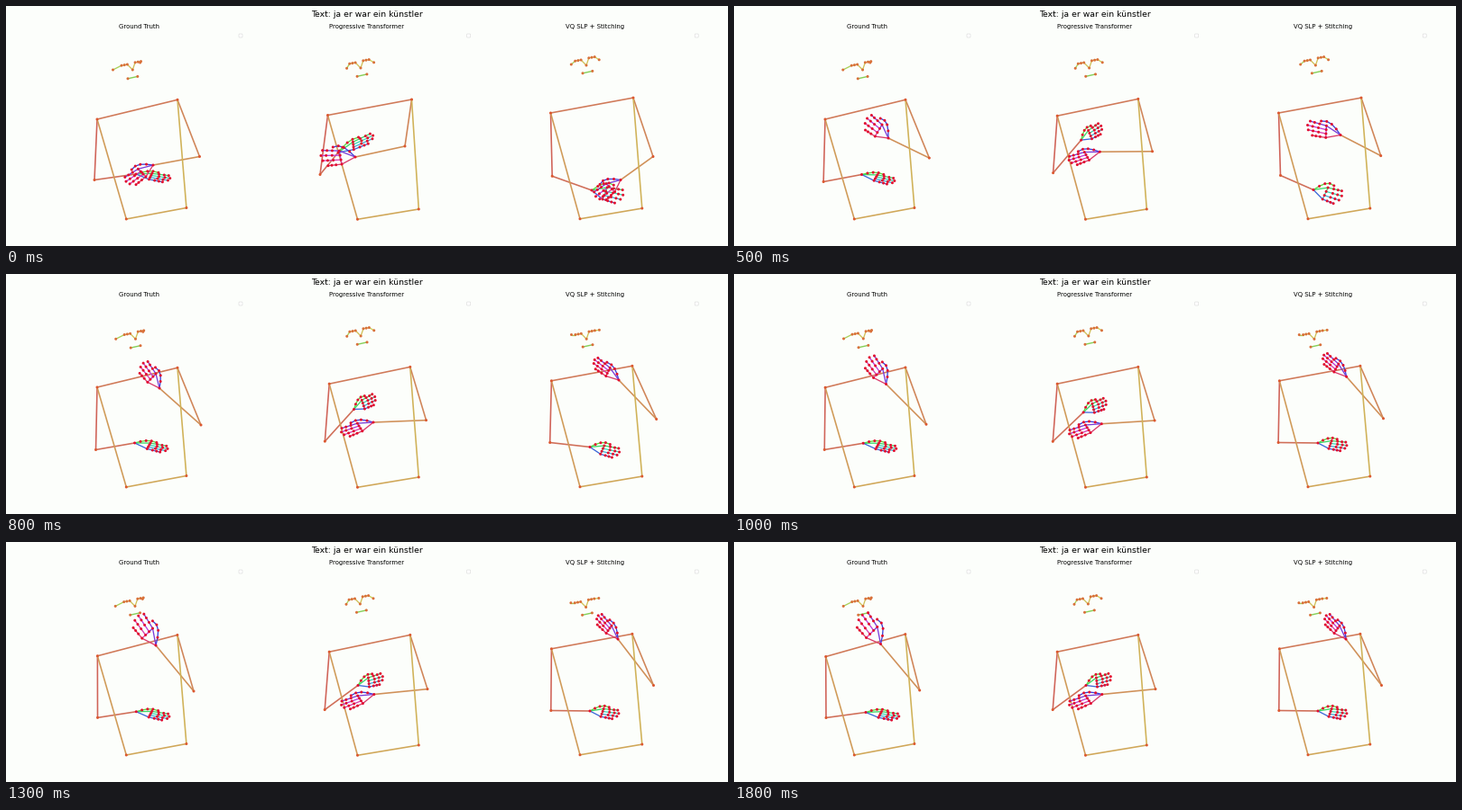
These frames come from a looping animation (800x267 px, 1.9 s). A matplotlib script:

```python
import colorsys

import matplotlib.pyplot as plt
import numpy as np
from matplotlib.animation import FuncAnimation
from matplotlib.collections import LineCollection
from matplotlib.patches import FancyBboxPatch

W, H, DPI = 800, 267, 100
PX = 72 / DPI
TICKS, TICK_MS = 38, 50

ARMS = ["ls le", "le lw", "ls rs", "rs re", "re rw", "ls lh", "lh rh", "rs rh"]
ARM_HUES = np.linspace(0.015, 0.125, len(ARMS))
LEFT_HUES = np.linspace(0.30, 0.62, 5)
RIGHT_HUES = np.linspace(0.66, 0.95, 5)


def hls(hue, light=0.58, sat=0.56):
    return colorsys.hls_to_rgb(hue, light, sat)


def path(n, keys):
    """Values at pose n, moving evenly between keys (pose, value, ...)."""
    times, *cols = np.array(keys, float).T
    return np.array([np.interp(n, times, c) for c in cols])


def points(n, keys):
    return path(n, keys).reshape(-1, 2)


def hand_shape(x, y, angle, length, width):
    """Thumb and four fingers; a negative width mirrors the hand."""
    a = np.radians(angle)
    along = length * np.array((np.cos(a), np.sin(a)))
    across = width * np.array((np.sin(a), -np.cos(a)))

    def at(u, v):
        return np.array((x, y)) + u * along + v * across

    thumb = [at(0.16 * j, 0.87 * np.sin(0.5 * j)) for j in range(5)]
    fingers = []
    for k in range(4):
        reach = 1 - 0.05 * (k - 1) ** 2
        base, side = 0.46 - 0.02 * k, 0.5 - k / 3
        fingers.append([at(base + (reach - base) * s, side * (1 + 0.15 * s))
                        for s in (0, 0.42, 0.73, 1)])
    return thumb, fingers


class Drawing:
    def __init__(self):
        self.segs, self.colors, self.widths = [], [], []
        self.dots, self.dot_colors = [], []

    def chain(self, pts, color, width):
        for a, b in zip(pts, pts[1:]):
            self.segs.append((a, b))
            self.colors.append(color)
            self.widths.append(width * PX)

    def dot(self, pts, color):
        self.dots.extend(pts)
        self.dot_colors.extend([color] * len(pts))

    def hand(self, pose, hues):
        thumb, fingers = hand_shape(*pose)
        colors = [hls(h, 0.54, 0.68) for h in hues]
        wrist, knuckles = thumb[0], [f[0] for f in fingers]
        self.chain(thumb, colors[0], 1.3)
        self.chain([wrist, knuckles[0]], colors[1], 1.3)
        self.chain([wrist, knuckles[3]], colors[4], 1.3)
        for finger, knuckle, color in zip(fingers, knuckles[1:] + knuckles[3:], colors[1:]):
            self.chain([finger[0], knuckle], color, 1.3)
            self.chain(finger, color, 1.3)
        self.dot(thumb + sum(fingers, []), "#e20f30")

    def face(self, nose, lift, ears, mouth):
        def eye(x, y, slope):
            return [nose + (x + 3.2 * j, y + slope * j) for j in range(3)]

        ears = nose + np.array(ears) + (0, lift)
        left, right = eye(-12.3, -4.8, -0.6), eye(2.8, -8.2, -0.6)
        lips = [nose + mouth, nose + mouth + (10.8, -2.4)]
        self.chain([ears[0], left[0]], hls(0.22), 1.3)
        self.chain([*left, nose, *right], hls(0.145), 1.3)
        self.chain([right[-1], ears[1]], hls(0.17), 1.3)
        self.chain(lips, hls(0.27), 1.4)
        self.dot([*ears, *left, nose, *right, *lips], "#d9703a")


class Signer:
    """Hand keys: pose, wrist x, y, angle, length, width."""

    def __init__(self, shoulders, hips, elbows, nose, ears, mouth, left, right):
        self.shoulders, self.hips, self.elbows = shoulders, hips, elbows
        self.nose, self.ears, self.mouth = nose, ears, np.array(mouth)
        self.left, self.right = left, right

    def draw(self, out, n):
        left, right = path(n, self.left), path(n, self.right)
        body = [*points(n, self.shoulders), *points(n, self.elbows), *np.array(self.hips)]
        out.dot(body, "#dc5830")
        joints = dict(zip(("ls", "rs", "le", "re", "lh", "rh"), body))
        joints.update(lw=left[:2], rw=right[:2])
        for bone, hue in zip(ARMS, ARM_HUES):
            out.chain([joints[j] for j in bone.split()], hls(hue), 1.6)
        x, y, lift = path(n, self.nose)
        out.face(np.array((x, y)), lift, self.ears, self.mouth)
        out.hand(left, LEFT_HUES)
        out.hand(right, RIGHT_HUES)


truth = Signer(
    shoulders=[(13, 101, 126, 190, 104.3), (29, 101.7, 127.5, 189.8, 102.6)],
    hips=[(133.3, 237), (199.9, 224.5)],
    elbows=[(0, 98, 193.5, 214.5, 167.5), (6, 99, 195.5, 216.5, 169.5),
            (13, 99.5, 195.5, 216, 168), (21, 101.5, 195.4, 208, 166),
            (29, 102, 195.5, 205.7, 165)],
    nose=[(0, 140.3, 71, 0), (4, 141.8, 70, 0), (13, 143.5, 72.3, 0), (21, 143, 71.4, 0)],
    ears=[(-21.8, 0), (8.3, -8)], mouth=(-5.3, 9.8),
    left=[(0, 144, 187, 9, 38, 7), (8, 141.5, 187.5, 13, 37, 7),
          (29, 146, 189.5, 9, 37, 7)],
    right=[(0, 163, 177, 145, 35, -12), (4, 163, 157, 190, 30, -13),
           (8, 171, 147, 218, 32, -15), (13, 170, 127, 233, 33, -13),
           (21, 166, 115, 235, 38, -16), (29, 162.5, 113.5, 233, 38, -17)])

transformer = Signer(
    shoulders=[(0, 356.5, 121.5, 449.5, 104), (4, 358.2, 122.2, 447.8, 103.4)],
    hips=[(389.5, 237.3), (457.3, 226)],
    elbows=[(0, 348, 187.5, 442, 156), (4, 354, 185, 460.7, 160.7),
            (10, 353.4, 186, 465, 162.3), (21, 353.2, 186.6, 467, 163.6)],
    nose=[(0, 393, 69, 0), (4, 394, 69, 0), (21, 392.4, 69, 0)],
    ears=[(-15.4, 0.3), (14.6, -6.2)], mouth=(-3.9, 9.3),
    left=[(0, 368, 163, -24, 43, 8), (4, 384, 148, -35, 27, 10),
          (13, 385.5, 150.5, -27, 27, 10), (21, 390, 159.5, -16, 29, 10)],
    right=[(0, 387, 168, 178, 38, -15), (4, 404, 160, 163, 34, -10),
           (13, 407, 165, 160, 37, -10), (21, 407.8, 169.5, 159, 38, -10)])

stitched = Signer(
    shoulders=[(8, 603.5, 119, 695, 102.1), (13, 604.4, 118.8, 693.9, 102.3)],
    hips=[(636, 236.8), (704.8, 225.1)],
    elbows=[(0, 605.2, 189.3, 717, 167.5), (8, 605.5, 188.5, 716.7, 166.6),
            (13, 602.7, 187.5, 720.7, 161.5), (21, 603.8, 187.5, 717.5, 159.5)],
    nose=[(0, 643, 66, 0), (8, 644.4, 66, 0), (13, 643.2, 72.3, -3.8), (21, 642.6, 72.5, -3.8)],
    ears=[(-16.7, -1), (14.2, -6.2)], mouth=(-4, 8.8),
    left=[(0, 649, 205, 13, 35, 14), (8, 642, 204.5, 17, 32, 14),
          (13, 647, 192.5, 13, 33, 10), (16, 647, 188, 8, 32, 9)],
    right=[(0, 681, 193.5, 142, 33, -13), (4, 677, 172, 163, 34, -12),
           (8, 672, 143.5, 193, 38, -13), (13, 679, 118, 217, 35, -10),
           (21, 678, 108, 227, 34, -10)])

SIGNERS = (truth, transformer, stitched)
TITLES = ("Ground Truth", "Progressive Transformer", "VQ SLP + Stitching")

plt.rcParams["font.family"] = "DejaVu Sans"
fig = plt.figure(figsize=(W / DPI, H / DPI), dpi=DPI, facecolor="#fcfefb")
ax = fig.add_axes((0, 0, 1, 1))
ax.set(xlim=(0, W), ylim=(H, 0))
ax.axis("off")

ax.text(W / 2, 12.2, "Text: ja er war ein künstler", size=9.26 * PX, ha="center")
for i, title in enumerate(TITLES):
    x = W / 2 + 252.6 * (i - 1)
    ax.text(x, 25.4, title, size=6.87 * PX, ha="center")
    ax.add_patch(FancyBboxPatch((x + 111.2, 31.6), 2.8, 2.8,
                                boxstyle="round,pad=0.6,rounding_size=0.8",
                                fc="white", ec="#dadada", lw=0.6 * PX))

bones = LineCollection([], capstyle="round", zorder=2)
ax.add_collection(bones)
dots = ax.scatter([], [], s=(3 * PX) ** 2, linewidths=0, zorder=3)


def update(tick):
    pose = tick - (tick + 3) // 5  # one tick in five repeats the pose
    out = Drawing()
    for signer in SIGNERS:
        signer.draw(out, pose)
    bones.set_segments(out.segs)
    bones.set_color(out.colors)
    bones.set_linewidth(out.widths)
    dots.set_offsets(out.dots)
    dots.set_facecolor(out.dot_colors)
    return bones, dots


anim = FuncAnimation(fig, update, frames=TICKS, interval=TICK_MS,
                     repeat=True, repeat_delay=0, blit=False)
plt.show()
```
